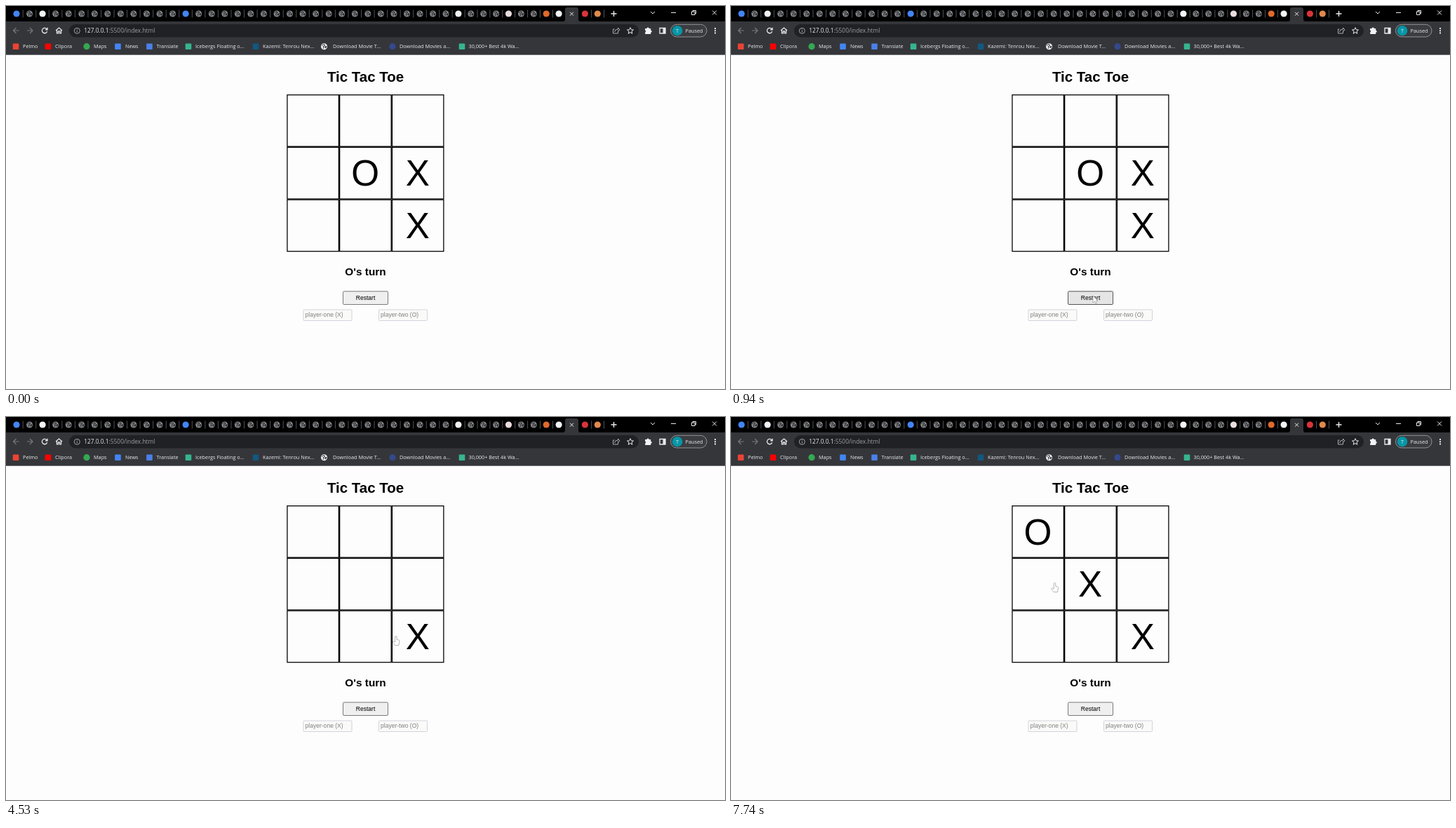
Recreate the animation shown at these times as an HTML page. Size 1025 by 546 pixels, loop 8000 ms.

```html
<!DOCTYPE html>
<html lang="en">
<head>
<meta charset="utf-8">
<title>Tic Tac Toe</title>
<style>
  html, body { margin: 0; width: 100%; height: 100%; overflow: hidden; background: #fdfdfd; }
  svg { display: block; }
  text { font-family: "Liberation Sans", Arial, sans-serif; }
  .ui text { font: 7.3px "Open Sans", "Noto Sans", sans-serif; fill: #e8eaed; }
  .ui .url { font-size: 8.35px; }
  .line { fill: none; stroke: #e8eaed; stroke-width: 1; }
  .dim { stroke: #77797d; }
  .mid { text-anchor: middle; }
  .mark { font-size: 51.2px; }
  .hint { font-size: 8.55px; fill: #808080; }
  .field { fill: #fafaf9; stroke: #d3d3dc; }
  #cursor path { fill: #fff; stroke: #a4a4a4; stroke-width: .8; stroke-linejoin: round; }
</style>
</head>
<body>
<svg width="1025" height="546" viewBox="0 0 1025 546">
  <defs>
    <g id="globe">
      <circle r="4.5"/>
      <path d="M-3.3-1.2 -1-3 1-2.4 0-.4-1.5.2-.5 1.8-1.6 3.2M1.2.2 3.4-.2 2 2.4Z" fill="none" stroke="#18191b" stroke-width="1"/>
    </g>
  </defs>
  <rect width="1025" height="546" fill="#fdfdfd"/>

  <g class="ui">
    <rect width="1025" height="23" fill="#000"/>
    <rect y="22" width="1025" height="47.7" fill="#35363a"/>
    <path d="M794 22q3 0 3-3V5q0-3 3-3h13q3 0 3 3v14q0 3 3 3Z" fill="#35363a"/>
    <g id="tabs"></g>
    <path class="line" stroke-width="1.2" d="M804 8.700l5 5m0-5l-5 5"/>
    <path class="line" style="stroke-width:1.4" d="M862.500 11h8m-4-4v8"/>
    <path class="line" d="M919 8l3 3 3-3M948 9.500h7M977.500 8h4.500v4.500h-4.500ZM979 8V6.500h4.500V11H982M1007 6.500l6 6m0-6l-6 6"/>

    <path class="line dim" style="stroke-width:1.2" d="M18.500 35h-8m4-4l-4 4 4 4M30 35h8m-4-4l4 4-4 4"/>
    <path class="line" style="stroke-width:1.3" d="M58.300 33.200a3.700 3.700 0 1 0 .3 3M59 30.800v3h-3M71 35l4.500-4 4.500 4M72.500 34.500v4.300h2v-3h2v3h2v-4.300"/>
    <rect x="90" y="26" width="812" height="18.500" rx="9.250" fill="#202124"/>
    <g class="line" style="stroke:#b0b3b8;stroke-width:.9">
      <circle cx="101.300" cy="35.300" r="4"/>
      <path d="M101.300 34.500v3m0-5v1"/>
    </g>
    <text class="url" x="111.300" y="38.300">127.0.0.1<tspan fill="#9aa0a6">:5500/index.html</tspan></text>
    <path class="line" style="stroke:#b8bbc0;stroke-width:.9" d="M867.500 33h-2v6h7v-2M867.500 37q.500-4 5-4v-2l2.500 3-2.500 2.500v-1.800"/>
    <path class="line" d="M890 30.700l1.300 3 3.200.3-2.500 2.100.8 3.200-2.800-1.800-2.800 1.800.8-3.200-2.500-2.100 3.200-.3Z"/>
    <path fill="#f1f3f4" d="M911 32h2.500a1.600 1.600 0 0 1 3.200 0h2.500v2.700a1.500 1.500 0 0 1 0 3v2.300h-8v-2.500a1.500 1.500 0 0 0 0-2.800Z"/>
    <path class="line" style="stroke-width:1.3" d="M932 31.500h8v7.500h-8Z"/>
    <path fill="#e8eaed" d="M936.500 31.500h3.500v7.500h-3.500Z"/>
    <rect x="947.500" y="26.300" width="51.500" height="17.700" rx="8.850" fill="#3c3d41" stroke="#9a9ca0" stroke-width=".9"/>
    <circle cx="957" cy="35.200" r="7.300" fill="#0697a7"/>
    <text class="mid" x="957" y="38">T</text>
    <text x="968.500" y="38" fill="#e8eaed">Paused</text>
    <path fill="#e8eaed" d="M1010 31h2v2h-2ZM1010 34.300h2v2h-2ZM1010 37.600h2v2h-2Z"/>
    <g id="bookmarks"></g>
  </g>

  <text class="mid" x="512.500" y="107.700" font-size="20.480" font-weight="bold">Tic Tac Toe</text>
  <g id="board"></g>
  <text id="status" class="mid" x="512.500" y="384" font-size="15.360" font-weight="bold"></text>
  <rect id="button" x="480.500" y="406.800" width="64" height="18.700" rx="1.500"/>
  <text class="mid" x="512.500" y="418.800" font-size="8.550">Restart</text>
  <rect class="field" x="424" y="433" width="69" height="15.500" rx="1"/>
  <rect class="field" x="531.500" y="433" width="69" height="15.500" rx="1"/>
  <text class="hint" x="426.500" y="443.300">player-one (X)</text>
  <text class="hint" x="534" y="443.300">player-two (O)</text>
  <g id="cursor">
    <path id="arrow" d="M0 0V10L2.300 8 3.900 11.600 5.400 11 3.900 7.400H7Z"/>
    <path id="hand" d="M-1.200 1Q0-.8 1.200 1V5.200L4.300 6Q5.200 6.400 5 8L4 13.500H-1.500L-4.700 9Q-4.500 7.300-2.700 8L-1.200 9Z"/>
  </g>
</svg>
<script>
const $ = id => document.getElementById(id);
const globe = (x, y, fill) => `<use href="#globe" x="${x}" y="${y}" fill="${fill}"/>`;
const dot = (x, y, fill) => `<circle cx="${x}" cy="${y}" r="4.6" fill="${fill}"/>`;
const box = (x, y, fill) => `<rect x="${x - 4.3}" y="${y - 4.3}" width="8.6" height="8.600" rx="1" fill="${fill}"/>`;

// Tab strip: most tabs carry a globe, a few a coloured dot
const tabDots = { 0: '#4285f4', 2: '#f1f3f4', 13: '#4285f4', 34: '#f1f3f4', 38: '#e9dcdc',
  41: '#e06a2c', 42: '#f1f3f4', 44: '#d9343a', 45: '#e08a4a' };
const tabX = i => i < 33 ? 15 + 18.55 * i : 627 + 17.9 * (i - 33) + (i > 43 ? 1.500 : 0);
for (let i = 0; i < 46; i++) {
  const x = tabX(i);
  if (i != 43) $('tabs').innerHTML += tabDots[i] ? dot(x, 11, tabDots[i]) : globe(x, 11, '#85878a');
  if (i < 42 || i > 43)
    $('tabs').innerHTML += `<path d="M${x + 9.2} 5.500v11" stroke="#66686b" stroke-width=".8"/>`;
}

// Bookmarks: icon shape, colour, icon x, label x, label
$('bookmarks').innerHTML = [
  [box, '#ea4335', 14, 24, 'Pelmo'],
  [box, '#f00', 60, 70, 'Clipora'],
  [dot, '#34a853', 115, 125, 'Maps'],
  [box, '#4285f4', 159.5, 170, 'News'],
  [box, '#4a80e8', 204.5, 214.500, 'Translate'],
  [box, '#35b58e', 260, 270, 'Icebergs Floating o...'],
  [box, '#12587f', 356, 366, 'Kazemi: Tenrou Nex...'],
  [globe, '#f1f3f4', 453.5, 466, 'Download Movie T...'],
  [dot, '#34488c', 551, 561, 'Download Movies a...'],
  [box, '#35b58e', 650, 659.500, '30,000+ Best 4k Wa...'],
].map(([icon, fill, x, tx, label]) => icon(x, 57.7, fill) + `<text x="${tx}" y="60.400">${label}</text>`).join('');

const SIDE = 74.75, LEFT = 400.3, TOP = 126.1;
for (let i = 0; i < 9; i++) {
  const x = LEFT + i % 3 * SIDE, y = TOP + (i / 3 | 0) * SIDE;
  $('board').innerHTML += `<rect x="${x + .64}" y="${y + .64}" width="${SIDE - 1.28}" height="${SIDE - 1.28}" fill="none" stroke="#000" stroke-width="1.28"/>
    <text class="mark mid" x="${x + SIDE / 2 - .3}" y="${y + SIDE / 2 + 18.2}"></text>`;
}
const marks = document.querySelectorAll('.mark');

// start time, marks, player to move
const turns = [
  [0, '    OX  X', 'O'],
  [2020, '         ', 'X'],
  [4010, '        X', 'O'],
  [5630, 'O       X', 'X'],
  [6910, 'O   X   X', 'O'],
];
// first step, last step, number of steps, x, y reached
const moves = [
  [100, 100, 1, 612, 235],
  [140, 280, 4, 563, 359],
  [350, 520, 5, 553, 386],
  [560, 890, 9, 517, 414],
  [940, 940, 1, 516, 413],
  [1120, 1270, 4, 517, 414],
  [3130, 3310, 7, 569.5, 326.5],
  [4530, 4880, 10, 433.5, 181.5],
  [5920, 6120, 7, 530, 243.5],
  [7330, 7490, 6, 476.5, 238],
  [7660, 7740, 4, 461.5, 236],
];

function pointer(t) {
  let x = 612, y = 235;
  for (const [from, to, n, nx, ny] of moves) {
    if (t < from) break;
    const step = 1 + Math.floor((t - from) * (n - 1) / (to - from || 1) + 1e-6);
    const part = Math.min(1, step / n);
    x += (nx - x) * part;
    y += (ny - y) * part;
  }
  return [x, y];
}

const inside = (x, y, l, t, r, b) => x >= l && x <= r && y >= t && y <= b;

function draw(t) {
  const [, cells, player] = turns.findLast(turn => t >= turn[0]);
  marks.forEach((m, i) => m.textContent = cells[i].trim());
  $('status').textContent = player + "'s turn";

  const [x, y] = pointer(t);
  const onBoard = inside(x, y, LEFT, TOP, LEFT + 3 * SIDE, TOP + 3 * SIDE);
  $('cursor').setAttribute('transform', `translate(${x} ${y})`);
  $('cursor').style.display = t < 100 ? 'none' : '';
  $('hand').style.display = onBoard ? '' : 'none';
  $('arrow').style.display = onBoard ? 'none' : '';

  const hover = inside(x, y, 480, 406, 545, 426);
  const pressed = t >= 1870 && t < 2020;
  $('button').setAttribute('fill', pressed ? '#f5f5f5' : hover ? '#e5e5e5' : '#efefef');
  $('button').setAttribute('stroke', pressed ? '#8d8d8d' : hover ? '#555558' : '#7b7b80');
}

const start = performance.now();
function tick() {
  draw((performance.now() - start) % 8000);
  requestAnimationFrame(tick);
}
tick();
</script>
</body>
</html>
```
